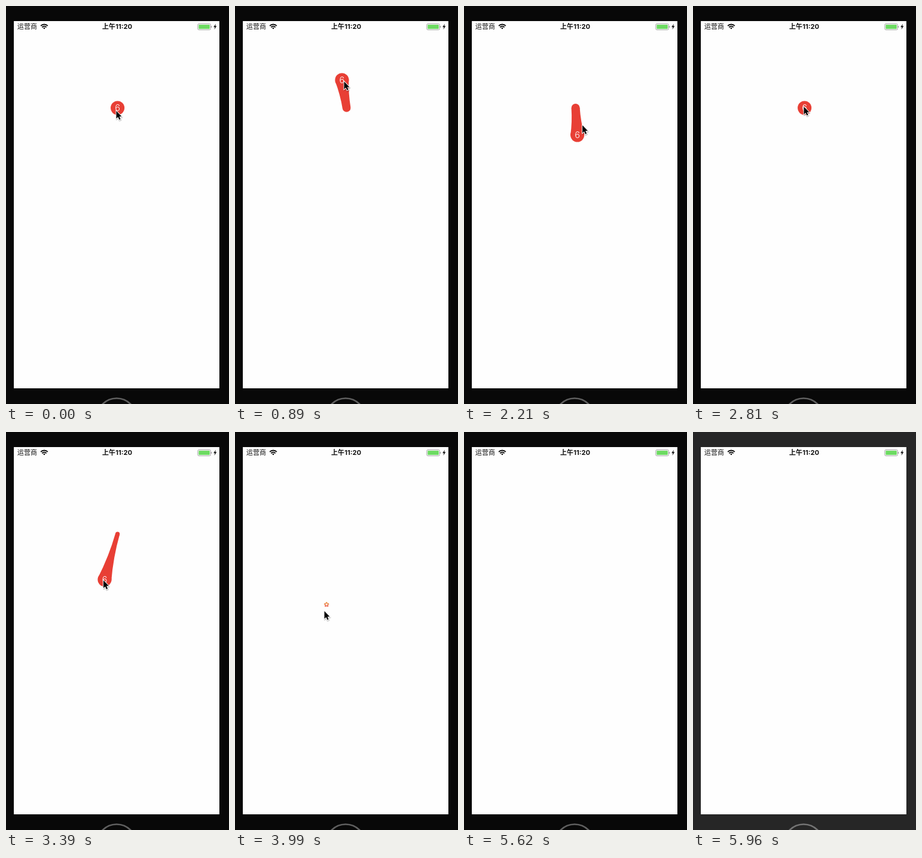
Write an HTML page that moves like this. It is 371x660 px and loops after 5.99 s.

```html
<!DOCTYPE html>
<html lang="zh">
<head>
<meta charset="utf-8">
<title>Sticky badge</title>
<style>
  html, body { margin: 0; width: 100%; height: 100%; overflow: hidden; background: #080808; }
  svg { display: block; width: 371px; height: 660px; }
  .cjk { font-family: "Noto Sans CJK SC", "Noto Sans CJK", sans-serif; }
  .num { font-family: Inter, Roboto, sans-serif; }
</style>
</head>
<body>
<svg viewBox="0 0 371 660">
  <defs>
    <path id="arrow" d="M0 0 V12.8 L2.9 10.1 L4.9 14.6 L7 13.7 L5.1 9.3 H8.9 Z"/>
  </defs>
  <rect id="bezel" width="371" height="660" fill="#080808"/>
  <rect x="13" y="25" width="342" height="609" fill="#fefefe"/>
  <circle id="home" cx="184" cy="683.5" r="33" fill="none" stroke="#5f5f5f" stroke-width="2.7"/>

  <g fill="#111" font-size="11">
    <text class="cjk" x="18.7" y="38.3">运营商</text>
    <text class="cjk" x="160" y="38.3" font-weight="700">上午</text>
    <text class="num" x="182.3" y="38.3" font-weight="700">11:20</text>
  </g>

  <g fill="none" stroke="#080808" stroke-width="2">
    <path d="M57.8 32.9 A8.4 8.4 0 0 1 69.4 32.9"/>
    <path d="M60 35.2 A5.2 5.2 0 0 1 67.2 35.2"/>
    <path d="M61.8 36.6 A2.8 2.8 0 0 1 65.4 36.6 L63.6 38.6 Z" fill="#080808" stroke="none"/>
  </g>

  <rect x="319" y="29.5" width="21.5" height="10" rx="2" fill="#fff" stroke="#a3a3a3"/>
  <rect x="320.5" y="31" width="18.5" height="7" rx=".7" fill="#6ddb62"/>
  <path d="M341.5 33 q1.6 1.5 0 3 z" fill="#a3a3a3" stroke="#a3a3a3" stroke-width=".6"/>
  <path d="M349 29.5 L345.3 34.9 H347.5 L346.6 39 L350.5 33.3 H348.2 Z" fill="#111"/>

  <g id="badge" fill="#e83f35">
    <path id="neck"/>
    <circle id="root" cx="185.6" cy="169"/>
    <g id="head">
      <circle r="11.5"/>
      <text class="num" y="5.2" font-size="14.5" font-weight="300" fill="#fff" text-anchor="middle">6</text>
    </g>
  </g>

  <g id="puff"></g>

  <g id="cursor">
    <use href="#arrow" x=".5" y="1.2" fill="none" stroke="#000" stroke-opacity=".18"
         stroke-width="3" stroke-linejoin="round"/>
    <use href="#arrow" fill="#000" stroke="#fff" stroke-width="1.8" paint-order="stroke"/>
  </g>
</svg>
<script>
const LOOP = 5990, STEP = 147.5, FLASH = 5960;
const HOME = [185.6, 169], R = 11.5, REACH = 80;
const el = id => document.getElementById(id);

function ease(k, from, to) {
  const u = Math.min(1, Math.max(0, (k - from) / (to - from)));
  return u * u * (3 - 2 * u);
}

// Each move: start step, end step, dx, dy
const travel = (start, moves, k) => moves.reduce(
  ([x, y], [from, to, dx, dy]) => {
    const u = ease(k, from, to);
    return [x + dx * u, y + dy * u];
  }, start);

// Counter-clockwise sweep around home: out, a dip near the top, back in.
function swing(k, top, rate) {
  const dip = 14 * Math.exp(-(((k - 6) / 1.9) ** 2));
  const r = (61 - dip) * ease(k, 0, 2) * (1 - ease(k, 13, 16));
  const a = (top + rate * (k - 6)) * Math.PI / 180;
  return [r * Math.cos(a), -r * Math.sin(a)];
}

function badgeAt(k) {
  const [dx, dy] = swing(k, 99.4, 21.8);
  const [x, y] = travel(HOME, [[19, 24, -33.3, 117]], k);
  return [x + dx, y + dy];
}

const cursorMoves = [
  [11, 18, 1, -7],
  [19, 24, -34.5, 122],
  [24, 27, -1.3, 8],
  [27, 32, 32, 25],
  [33, 34, -2, -10],
  [34, 37, 151, 322]
];

function cursorAt(k) {
  const [dx, dy] = swing(k, 92.3, 25.5);
  const [x, y] = travel([183.5, 174], cursorMoves, k);
  const pull = 1.04 - 0.048 * Math.max(0, k - 6);
  return [x + dx * pull, y + dy * pull];
}

// Two quadratic curves join the shrinking root to the head.
function neckPath([x, y], d, r) {
  const [hx, hy] = HOME, s = (x - hx) / d, c = (y - hy) / d;
  const side = n => ({
    a: [hx + n * r * c, hy - n * r * s],
    q: [hx + n * r * c + s * d / 2, hy - n * r * s + c * d / 2],
    b: [x + n * R * c, y - n * R * s]
  });
  const l = side(-1), m = side(1);
  return `M${l.a} L${m.a} Q${m.q} ${m.b} L${l.b} Q${l.q} ${l.a}Z`;
}

const show = (node, on) => node.setAttribute("visibility", on ? "visible" : "hidden");
const move = (node, [x, y], s = 1) =>
  node.setAttribute("transform", `translate(${x} ${y}) scale(${s})`);

// A small ring of five blobs
el("puff").innerHTML = Array.from({ length: 5 }, (_, i) => {
  const a = Math.PI * (0.4 * i - 0.5);
  const x = 2.7 * Math.cos(a), y = 2.7 * Math.sin(a);
  return `<circle cx="${x}" cy="${y}" r="1.5" fill="hsl(${18 - 4 * y} 80% 62%)"/>`;
}).join("");

function draw(t) {
  const k = Math.max(0, Math.floor((t - 150) / STEP) + 1);
  const pos = badgeAt(k);
  const d = Math.hypot(pos[0] - HOME[0], pos[1] - HOME[1]);
  const alive = k < 26, tied = alive && d > 0.5 && d < REACH;
  const r = R - d / 10;

  show(el("badge"), alive);
  move(el("head"), pos);
  el("neck").setAttribute("d", tied ? neckPath(pos, d, r) : "");
  el("root").setAttribute("r", tied ? r : 0);

  show(el("puff"), !alive && k < 28);
  move(el("puff"), pos, Math.max(1, 1.9 - 0.9 * (k - 26)));

  show(el("cursor"), k < 38);
  move(el("cursor"), cursorAt(k));

  const lit = t >= FLASH;
  el("bezel").setAttribute("fill", lit ? "#262626" : "#080808");
  el("home").setAttribute("stroke", lit ? "#747474" : "#5f5f5f");
}

const start = performance.now();
function tick() {
  draw((performance.now() - start) % LOOP);
  requestAnimationFrame(tick);
}
draw(0);
requestAnimationFrame(tick);
</script>
</body>
</html>
```
